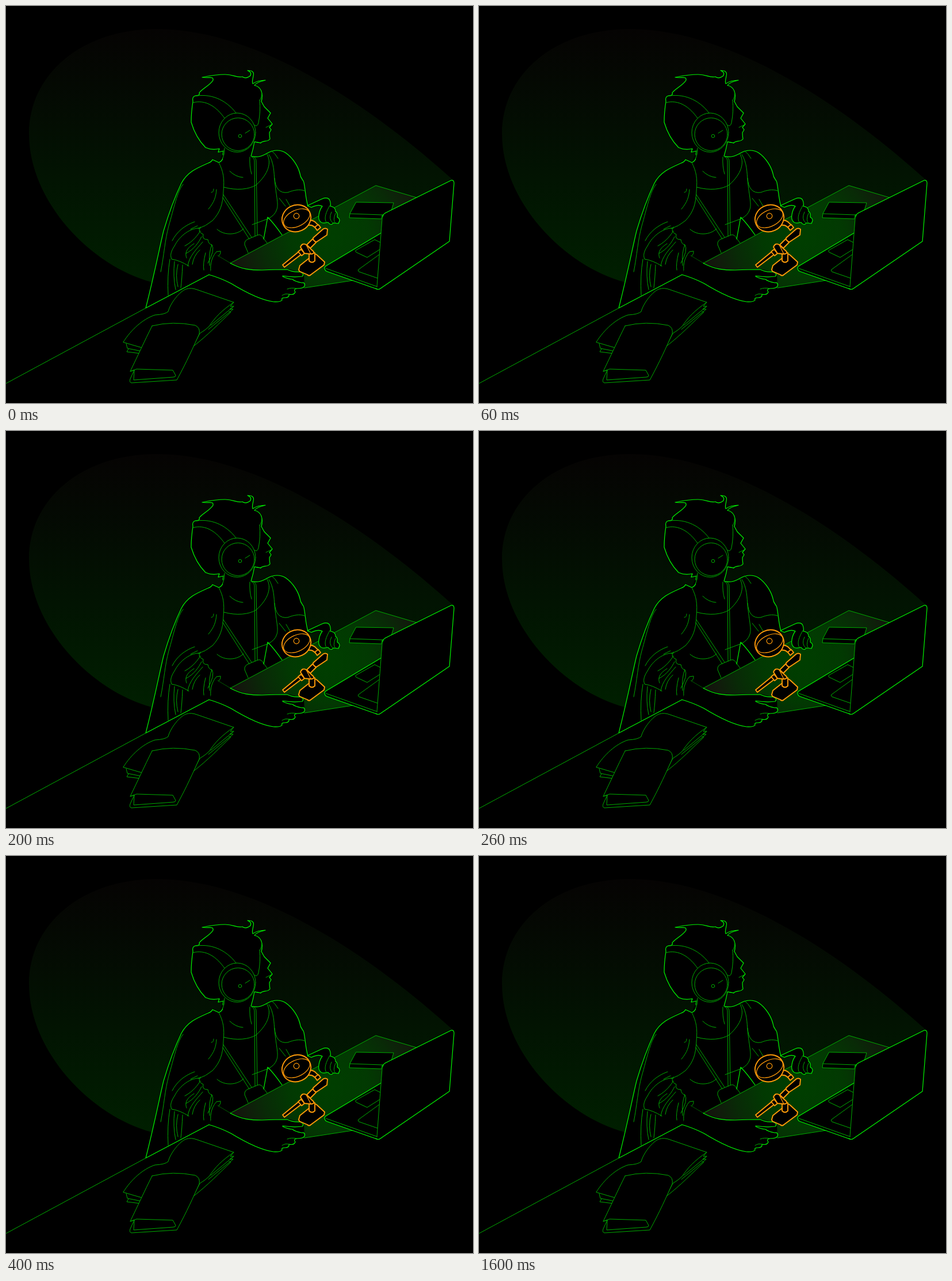
These frames come from a looping animation (812 by 690 pixels, 2.4 s). An HTML page with a canvas:

```html
<!DOCTYPE html>
<html lang="en">
<head>
<meta charset="utf-8">
<title>Night recording</title>
<style>
html, body { margin: 0; width: 100%; height: 100%; overflow: hidden; background: #000; }
canvas { display: block; width: 812px; height: 690px; }
</style>
</head>
<body>
<canvas id="stage" width="812" height="690"></canvas>
<script>
const ctx = document.getElementById('stage').getContext('2d');
const LOOP = 2400, STEP = 100, FLASHES = 2, DIM = 0.38;
const BRIGHT = '#00f500', SOFT = '#00aa00', ORANGE = '#ff9a0a';
ctx.lineCap = ctx.lineJoin = 'round';

function draw(d, stroke, width = 1, fill) {
  const path = new Path2D(d);
  if (fill) { ctx.fillStyle = fill; ctx.fill(path); }
  if (stroke) { ctx.strokeStyle = stroke; ctx.lineWidth = width; ctx.stroke(path); }
}
const edge = (d, fill) => draw(d, BRIGHT, 1.2, fill);
const soft = (d, fill) => draw(d, SOFT, 1, fill);
const mic = d => draw(d, ORANGE, 1.9, '#000');

function ring(x, y, rx, ry, color = SOFT, width = 1, turn = 0, fill) {
  ctx.beginPath();
  ctx.ellipse(x, y, rx, ry, turn, 0, Math.PI * 2);
  if (fill) { ctx.fillStyle = fill; ctx.fill(); }
  ctx.strokeStyle = color;
  ctx.lineWidth = width;
  ctx.stroke();
}

function shade(gradient, stops) {
  stops.forEach(([at, color]) => gradient.addColorStop(at, color));
  return gradient;
}
const beamFill = shade(ctx.createLinearGradient(0, 40, 0, 482),
  [[0, '#0e0907'], [0.25, '#0a1a07'], [0.6, '#053505'], [1, '#005200']]);
const deskFill = shade(ctx.createRadialGradient(562, 400, 12, 562, 400, 176),
  [[0, '#00a200'], [0.35, '#059605'], [0.65, '#176e12'], [1, '#3a2c26']]);

function glow(d, fill, level) {
  ctx.globalAlpha = level;
  draw(d, null, 0, fill);
  ctx.globalAlpha = 1;
}

function body() {
  draw('M370 271 L359 267 C335 279 315 289 305 308 C293 333 282 364 274 391 C266 424 260 458 243 525 L353 467 L390 447 L525 374 V347 C522 325 520 313 517 306 L512 299 C508 280 497 260 483 253 C470 249 460 252 454 256 C445 262 438 264 426 261 L432 236 L381 246 Z', null, 0, '#000');
  edge('M378 262 Q376 270 370 272 L359 267 C358 271 354 272 349 274 C331 282 315 289 305 308 C293 333 282 364 274 391 C266 424 260 458 243 525 L353 467');
  edge('M426 261 C438 264 445 261 454 256 C466 249 478 250 486 255 C499 264 508 279 511 291 C512 301 517 301 518 307 C521 323 521 334 525 348');
  soft('M308 310 C298 320 291 355 283 382 C276 408 275 432 269 462');
  soft('M370 272 C378 288 380 299 378 322 C377 344 373 358 359 373 Q347 383 334 387');
  soft('M366 319 C365 332 362 341 352 353 M361 318 Q361 324 357 324');
  soft('M328 375 C311 381 297 392 289 408 M333 382 Q326 385 321 388 M338 386 C321 385 302 399 293 417 C285 429 286 435 288 440 Q302 442 318 452');
  soft('M311 417 C326 409 334 397 338 391 M313 430 C327 423 335 411 340 401 M314 438 C310 427 316 420 327 413 M316 452 C318 435 332 422 342 410 M324 449 Q326 434 337 424');
  soft('M338 384 Q332 392 343 397 Q340 406 351 406 Q352 414 358 415 Q352 429 354 451 M358 415 Q364 424 351 447 M344 459 Q342 449 347 429');
  soft('M357 466 C354 454 356 438 366 427 L373 426 Q374 431 370 434 Q362 449 363 466 M368 434 L390 447');
  soft('M285 440 Q280 469 282 503 M293 444 Q290 470 295 493 M299 449 Q294 469 299 488 M307 450 Q306 474 304 490');
  soft('M379 315 C401 321 422 319 435 311 C456 292 463 272 453 256 M457 258 C466 272 466 290 467 303 C470 331 474 344 471 353 Q468 364 455 370 L428 380');
  soft('M462 252 Q468 256 473 265 M467 299 Q469 327 490 324 C500 320 510 318 519 321 M475 334 L486 348 M487 336 L494 348');
  soft('M389 287 Q399 297 412 298 M424 262 Q423 279 427 292 M378 328 L427 402 M377 333 L423 405 M427 262 Q432 264 432 270 L433 400 M430 262 Q435 264 435 270 L437 398');
  soft('M367 388 C380 400 403 398 413 387 M421 429 L415 415 Q414 408 421 405 L438 398 Q444 396 448 404 L454 412');
  edge('M448 405 L455 367 Q466 378 480 398');
}

function head() {
  edge('M341 124 C354 126 361 121 360 129 C355 138 340 144 336 151 Q338 156 329 156 Q323 158 325 166 C323 179 322 191 322 202 C328 222 337 236 347 246 Q358 251 371 248 L369 254 L378 252 L377 259 L380 247 L432 236 L443 238 C447 233 455 237 459 231 Q458 226 458 220 L461 215 L458 211 L463 205 L455 195 L460 186 Q454 180 449 175 L444 166 C448 151 443 140 432 138 Q436 132 451 129 Q438 129 429 135 C426 127 435 117 427 113 L420 112 Q429 116 424 122 Q417 127 411 123 C399 125 397 119 381 119 Q365 119 341 124 Z', '#000');
  draw('M380 246 L432 235 L426 261 L378 265 Z', '#000', 2, '#000');
  soft('M380 247 Q381 256 377 264');
  edge('M443 238 L432 236 Q430 248 426 261');
  soft('M327 157 C354 151 382 162 400 186 M325 168 C347 162 366 175 380 195 M441 164 Q443 183 439 203 Q437 211 432 207');
  soft('M441 164 Q446 158 444 148 M452 211 L460 207');
  ring(402, 220, 32, 34, SOFT, 1, 0, '#000');
  ring(403.5, 223, 28.5, 28.5);
  ring(407, 226, 2.8, 2.8);
  soft('M416 221 L424 216');
}

function laptop() {
  soft('M609 341 L674 342 L668 362 L654 363 L653 370 L597 368 L598 361 Z', '#000');
  soft('M598 361 L654 363');
  edge('M653 394 L556 452 Q551 456 557 461 L645 492', '#000');
  soft('M556 456 L646 488 M649 432 L613 458 Q611 460 614 462 L646 473 M651 411 L641 406 L609 424 Q606 426 609 428 L628 437 L650 423');
  const lid = 'L645 487 L654 370 Q654 362 661 359';
  draw('M661 359 L774 303 Q779 302 779 308 L771 409 L651 491 ' + lid, null, 0, '#000');
  soft('M645 487 ' + lid);
  edge('M655 366 Q656 361 661 359 L774 303 Q779 302 779 308 L771 409 L651 491 Q647 494 643 491');
}

function farHand() {
  edge('M524 347 L550 335 Q558 332 562 336 Q565 341 564 348 Q573 349 573 357 Q577 359 576 367 Q580 369 580 373 L578 378 L569 377 Q565 383 560 376 Q549 379 546 374 C541 369 545 354 550 348 Q543 344 531 350 Z', '#000');
  soft('M557 376 C552 369 557 357 563 347 M568 377 Q560 370 566 358 M574 378 Q567 374 573 360');
}

function microphone() {
  mic('M526 373 Q534 371 540 378 L546 384 L542 389 L536 384 Q532 380 525 381 Z');
  mic('M537 384 L543 380 L547 385 L541 390 Z');
  ring(505, 369, 25.5, 23, ORANGE, 1.9, -0.45, '#000');
  ring(505.5, 369, 24.5, 14, ORANGE, 1.2, -0.45);
  ring(505, 365, 4.8, 4.8, ORANGE, 1.2);
  mic('M534 403 L551 388 Q555 385 559 388 L558 398 L540 410 L534 409 Z');
  mic('M523 415 L533 405 L539 411 L529 421 Z');
  mic('M509 458 L511 451 L535 432 Q538 430 541 433 L554 445 L553 450 L530 467 Q527 470 524 467 L510 461 Z');
  mic('M527 430 L537 429 L537 443 Q532 448 527 443 Z');
  mic('M481 450 L509 427 L513 432 L484 454 Z');
  mic('M508 427 L513 423 L519 430 L514 434 Z');
  mic('M512 419 Q515 411 522 415 L535 427 Q536 431 530 431 L519 430 Z');
  draw('M522 415 L530 431', ORANGE, 1.2);
}

function nearHand() {
  draw('M353 467 L368 434 L390 447 C411 458 425 459 445 459 L489 457 L512 463 L518 467 L519 488 L503 497 L490 506 Q482 515 465 514 C441 511 414 496 391 482 Q371 473 353 467 Z', null, 0, '#000');
  edge('M353 467 Q371 472 391 482 C414 496 441 511 465 514 Q477 515 480 511 Q478 507 485 507 Q493 507 492 501 Q501 503 503 497 Q499 492 506 491 Q517 491 519 487 Q521 480 514 481 Q503 479 498 475 Q488 474 481 470');
  edge('M390 447 C411 458 425 459 445 459 Q469 458 489 458 Q499 463 510 462 Q520 465 515 470 Q500 472 481 469');
  soft('M505 491 Q496 489 489 492 M492 501 Q486 499 480 503');
}

function books() {
  soft('M204 584 C218 562 238 544 259 537 Q277 536 282 531 C286 516 302 496 313 492 Q322 489 332 493 L396 515 C375 529 363 542 353 557 Q347 563 337 569 L325 592 L237 594 Z', '#000');
  soft('M209 587 L211 595 L236 600 M213 596 L210 601 L234 604');
  soft('M396 515 L390 522 L396 522 L356 555 M396 522 L389 527 L395 527 L352 562 M388 531 L391 532 C372 550 350 573 325 592');
  soft('M254 556 Q290 547 329 555 Q338 559 336 570 C325 594 315 617 297 650 L218 655 Q214 654 216 648 L223 633 L216 635 C229 608 241 582 254 556 Z', '#000');
  soft('M216 635 L227 631 L290 633 L295 642 Q295 645 291 645 L222 650 L223 633');
}

function scene(level) {
  ctx.fillStyle = '#000';
  ctx.fillRect(0, 0, 812, 690);
  glow('M778 303 C640 178 440 40 262 40 C130 40 40 120 40 222 C40 340 148 452 254 480 L330 440 L500 440 Z', beamFill, level);
  body();
  head();
  const desk = 'M643 312 L714 333 L655 363 L645 470 L603 477 L519 490 L390 447 Z';
  draw(desk, null, 0, '#000');
  glow(desk, deskFill, level);
  soft('M390 447 L643 312 L714 333 M519 490 L603 477');
  laptop();
  farHand();
  nearHand();
  microphone();
  soft('M0 656 L243 525');
  books();
}

// The lamp flashes on every second step, then rests until the loop restarts.
function frame(now) {
  const step = Math.floor((now % LOOP) / STEP);
  const lit = step < FLASHES * 2 && step % 2 === 1;
  scene(lit ? 1 : DIM);
  requestAnimationFrame(frame);
}
scene(DIM);
const start = performance.now();
requestAnimationFrame(t => frame(Math.max(0, t - start)));
</script>
</body>
</html>
```
